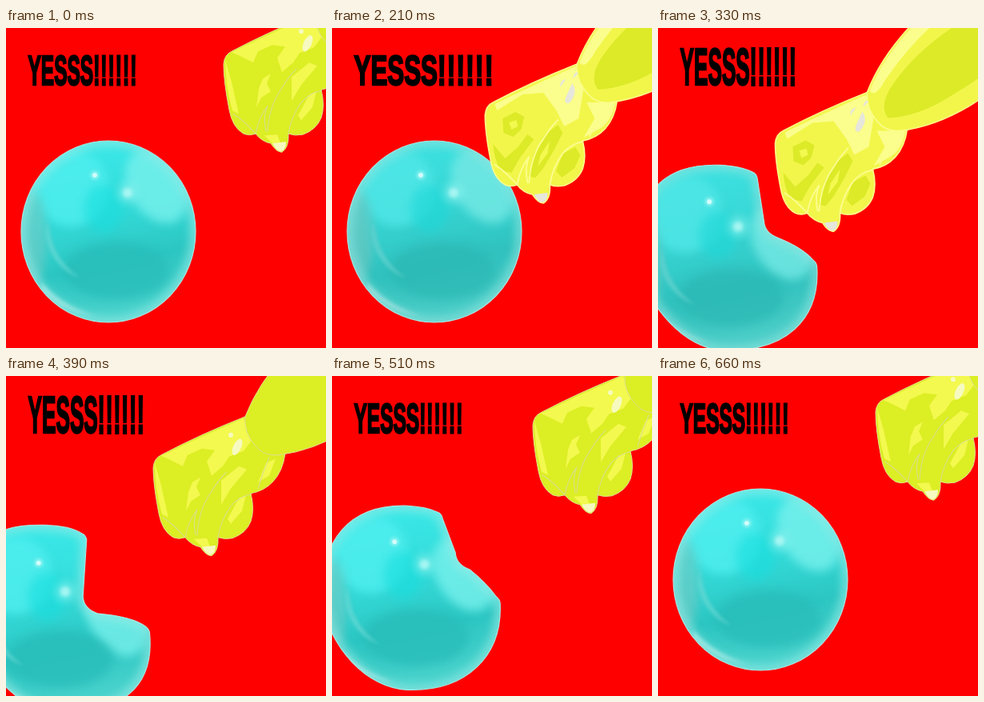
Recreate the animation shown at these times as an HTML page. Size 400 by 400 pixels, loop 690 ms.

```html
<!DOCTYPE html>
<html lang="en">
<head>
<meta charset="utf-8">
<title>Punch</title>
<style>
  html, body { margin: 0; width: 100%; height: 100%; overflow: hidden; background: #f00; }
  svg { display: block; width: 100vw; height: 100vh; }
  .soft { filter: blur(6px); }
  .mist { filter: blur(2px); }
  .hand { fill: #dcee24; stroke: #dfe08e; stroke-width: 1; stroke-linejoin: round; }
  .lite { fill: #f3f94e; }
  .dark { fill: #dcea28; }
  .pale { fill: #fbfd8c; }
  .shine { fill: #f6fac0; }
  .crease { fill: none; stroke: #d9e08a; stroke-width: 1.1; stroke-linecap: round; }
  .warm { display: none; }
  .hit .warm { display: inline; }
  .hit .cool { display: none; }
  .hit .hand { fill: #f2f64a; stroke: #fbfd8c; stroke-width: 1.6; }
  .hit .crease { stroke: #fbfd8c; stroke-width: 2; }
  .hit .shine { fill: #e6e6dc; }
  text { font: bold 51px "Liberation Sans", Arial, sans-serif; stroke: #000; stroke-width: 2; vector-effect: non-scaling-stroke; }
  tspan { letter-spacing: 2.2px; stroke-width: 3; }
</style>
</head>
<body>
<svg id="stage" viewBox="0 0 400 400">
  <defs>
    <clipPath id="ballClip"><path class="skin"/></clipPath>
    <linearGradient id="aqua" x1="0" y1="0" x2=".2" y2="1">
      <stop offset="0" stop-color="#3cecec"/>
      <stop offset=".45" stop-color="#34dcda"/>
      <stop offset=".75" stop-color="#2cc6c2"/>
      <stop offset="1" stop-color="#48d2cc"/>
    </linearGradient>
  </defs>
  <rect width="400" height="400" fill="#f00"/>

  <g id="word"><text>YESSS<tspan>!!!!!!</tspan></text></g>

  <g id="ball">
    <path class="skin" fill="url(#aqua)"/>
    <g clip-path="url(#ballClip)">
      <ellipse class="soft" cx="82" cy="200" rx="46" ry="48" fill="#50eeee" opacity=".8"/>
      <g id="sheen">
        <ellipse class="soft" cx="188" cy="198" rx="34" ry="50" transform="rotate(-32 188 198)" fill="#78f0ec" opacity=".8"/>
      </g>
      <ellipse class="soft" cx="122" cy="226" rx="24" ry="30" fill="#18dede" opacity=".6"/>
      <ellipse class="soft" cx="33" cy="262" rx="18" ry="58" fill="#70cac4" opacity=".65"/>
      <ellipse class="soft" cx="138" cy="304" rx="66" ry="36" fill="#28bcb8" opacity=".75"/>
      <path class="mist" d="M52 240Q56 288 92 312Q72 306 58 284Q46 262 52 240Z" fill="#66d8d4" opacity=".8"/>
      <path class="mist" d="M44 318Q70 348 112 360Q68 354 44 328Z" fill="#b4e8e4" opacity=".75"/>
      <path class="skin soft" fill="none" stroke="#94eae4" stroke-width="13" opacity=".7"/>
      <path class="skin warm" fill="#5f8f92" opacity=".08"/>
      <g id="glint">
        <circle class="soft" cx="152" cy="206" r="12" fill="#8cf2ee" opacity=".7"/>
        <circle class="mist" cx="152" cy="206" r="6" fill="#b4f8f4" opacity=".8"/>
      </g>
      <circle class="mist" cx="111" cy="184" r="5" fill="#9cf6f4"/>
      <circle cx="111" cy="184" r="2.8" fill="#d4fcfa"/>
    </g>
    <path class="skin" fill="none" stroke="#a8e4de" stroke-width="1.2"/>
  </g>

  <g id="fist">
    <path class="hand" d="M119 158Q166 133 224 110L250 130L274 156Q271 178 259 191Q248 203 231 206Q236 226 231 241Q225 256 208 262Q198 264 190 261Q191 278 182 284Q175 284 168 273Q157 271 149 261Q141 264 134 261Q120 253 116 231Q109 195 109 174Q110 162 119 158Z"/>
    <g class="cool">
      <path class="lite" d="M119 159Q170 134 222 112L232 140L222 153L204 160L196 172L182 184L176 166L186 152L170 150L152 158L146 172L130 164Z"/>
      <path class="lite" d="M111 168L119 196L128 236L120 232Q111 200 111 168ZM158 192L168 186L163 198L168 208L156 216L150 228L153 204ZM194 190L216 172L226 176L206 200L194 220ZM216 212L225 208L220 228L206 244L202 238Z"/>
      <path class="lite" d="M250 168L262 163L254 184L240 192ZM160 263L176 262L183 280L174 277Z"/>
      <ellipse class="shine" cx="214" cy="148" rx="5" ry="11" transform="rotate(25 214 148)"/>
      <circle class="shine" cx="206" cy="133" r="3"/>
    </g>
    <g class="warm">
      <path class="pale" d="M121 160Q168 137 222 113L232 142L226 178L208 188L198 168L182 146L156 148L124 168Z"/>
      <path class="pale" d="M236 158L272 158Q268 180 254 190L232 202L246 178Z"/>
      <path class="dark" d="M131 178L147 170L158 176L154 192L144 201L132 196ZM119 210L134 228L150 214L162 198L170 204L152 228L142 246L128 243Q120 228 119 210Z"/>
      <path class="lite" d="M139 183L148 180L150 188L142 192Z"/>
      <path class="dark" d="M163 250L170 222L184 198L200 186L206 196L196 216L182 240L172 252ZM198 244L206 222L222 214L228 224L221 240L205 252Z"/>
      <path class="lite" d="M178 224L190 206L187 222L175 238Z"/>
    </g>
    <path class="crease" d="M149 261Q153 240 164 226Q158 240 162 258M164 258Q166 226 181 205Q190 190 200 180M190 261Q193 240 206 222Q216 210 231 207M121 236Q134 244 149 261M240 200Q246 180 254 161"/>
    <path class="shine" d="M170 273L187 271Q187 281 181 283Q175 283 170 273Z"/>
    <path class="hand" d="M330 -30Q302 -2 279 26Q240 68 224 110Q222 130 237 147Q248 160 266 158Q308 153 352 127Q398 98 440 62L440 -30Z"/>
    <g class="warm">
      <path class="pale" d="M330 -28Q302 0 280 28Q243 68 227 108Q234 118 247 94Q276 52 308 24L350 -28Z"/>
      <path class="dark" d="M440 -10Q372 4 332 28Q284 60 256 100Q238 126 250 142Q288 140 326 116Q382 84 440 30Z"/>
      <path class="shine" d="M218 134Q226 146 214 159Q206 160 211 149ZM203 139Q202 130 210 129ZM219 128Q220 119 226 121Z"/>
    </g>
  </g>
</svg>
<script>
const LOOP = 690, STEP = 30;
const HIT = 270, REACH = 163;
const back = [[270, 163], [390, 88], [450, 52], [480, 35], [510, 21], [540, 11], [570, 5], [600, 1.5], [660, 0]];
const push = [[210, 0], [420, 1], [570, 0]];

const $ = id => document.getElementById(id);
const stage = $('stage'), skins = document.querySelectorAll('.skin');
const move = (id, x, y, extra = '') => $(id).setAttribute('transform', `translate(${x} ${y})${extra}`);

function sample(keys, t) {
  const i = keys.findIndex(k => k[0] > t);
  if (i < 0) return keys[keys.length - 1][1];
  if (i === 0) return keys[0][1];
  const [t0, a] = keys[i - 1], [t1, b] = keys[i];
  return a + (b - a) * (t - t0) / (t1 - t0);
}

// Ball outline; s is the depth of the dent from 0 to 1.
function skin(s) {
  if (!s) return 'M19 254.5A109 113.5 0 1 1 237 254.5A109 113.5 0 1 1 19 254.5Z';
  const vx = 205 - 45 * s, vy = 186 + 62 * s;
  const cx = 237 + 15 * s, cy = 252 + 24 * s;
  const top = 141 - 5 * s;
  return `M${cx} ${cy}
    C${237 + 22 * s} ${317 + 25 * s} ${188 + 32 * s} ${368 + 8 * s} 128 ${368 + 3 * s}
    C${68 + 24 * s} 368 ${19 + 24 * s} 317 19 254.5
    C19 ${192 - 24 * s} ${68 - 35 * s} ${141 - 8 * s} ${128 - 10 * s} ${top}
    Q150 ${top + 1} 165 147
    Q170 149 171 155
    L${vx} ${vy - 13}
    Q${vx + 1} ${vy + 2} ${vx + 18} ${vy + 8}
    Q${cx - 14 - 8 * s} ${cy - 30 + 10 * s} ${cx - 5} ${cy - 9}
    Q${cx} ${cy - 5} ${cx} ${cy}Z`;
}

function draw(t) {
  const reach = t < HIT ? REACH * (t / HIT) ** 2.8 : sample(back, t);
  move('fist', REACH - reach, -0.79 * (REACH - reach));

  const s = sample(push, t), d = skin(s);
  skins.forEach(p => p.setAttribute('d', d));
  move('ball', -82 * s, 58 * s);
  move('glint', -9 * s, 16 * s);
  move('sheen', 24 * s, 66 * s);

  const [wide, tall] = t < 210 || t >= 420 ? [1, 1] : t < 300 ? [1.28, 1] : [1.07, 1.28];
  move('word', 27.5, 71, ` scale(${0.48 * wide} ${tall})`);
  stage.classList.toggle('hit', t >= 210 && t < 360);
}

function tick() {
  draw(Math.floor(performance.now() % LOOP / STEP) * STEP);
  requestAnimationFrame(tick);
}
tick();
</script>
</body>
</html>
```
